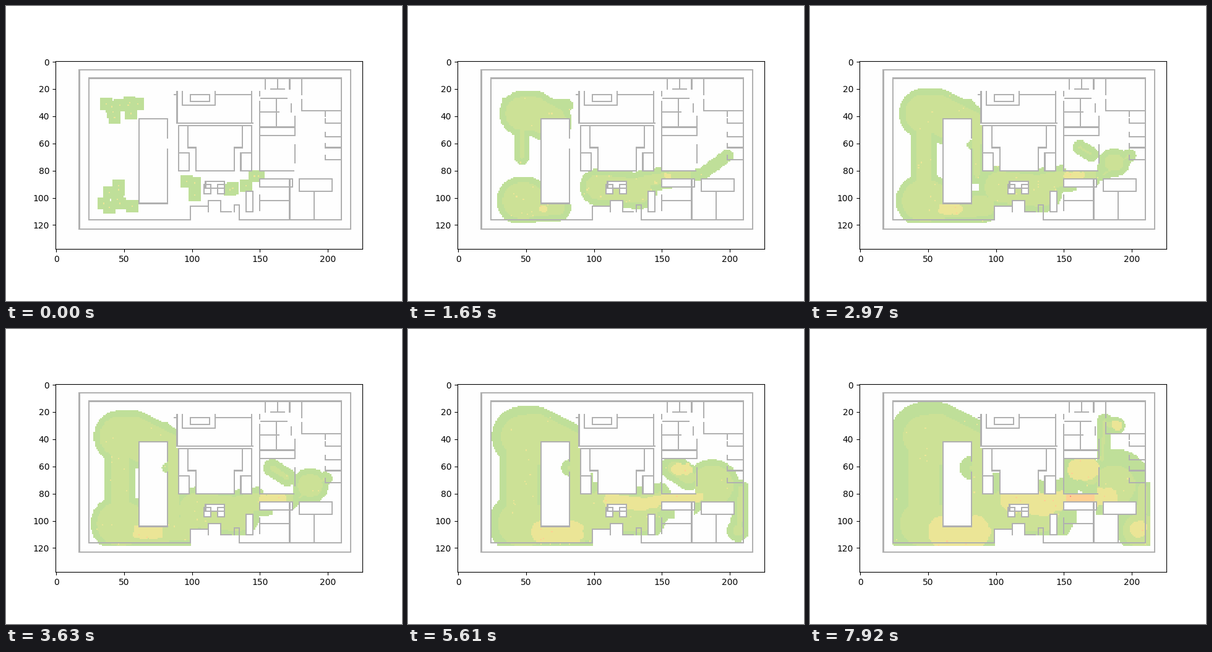
A matplotlib script for the animation above (8 s loop, 640 px wide and 476 px high).

```python
import numpy as np
import matplotlib.pyplot as plt
from matplotlib.animation import FuncAnimation
from matplotlib.colors import to_rgb

COLS, ROWS = 226, 138
LOOP, TICK, STEP = 8000, 40, 330
STEPS = LOOP // STEP + 1
RIM = 4.5          # half the width of one visitor's footprint
CORE_AGE = 12      # steps until the busy core of a group stops growing
X, Y = np.meshgrid(np.arange(COLS), np.arange(ROWS))

# empty, quiet, busy, warm, hot, peak, wall
PALETTE = np.array([to_rgb(c) for c in (
    "#fefefe", "#bfdf99", "#cce196", "#ebe596",
    "#fdd093", "#fb8d80", "#b0b0b0")])
WALL = 6

# where visitors stand at the start
SEEDS = [(37, 31), (41, 33), (43, 41), (42, 37), (47, 32), (54, 30), (53, 32),
         (60, 31), (55, 38), (46, 91), (46, 94), (39, 96), (45, 101),
         (35, 104), (39, 107), (47, 104), (56, 106), (96, 88), (102, 89),
         (102, 98), (128, 94), (130, 93), (140, 91), (146, 84), (149, 84)]

# groups: zone, from, to, departure, arrival, first radius, growth per step
CROWD = [
    ("open", (47, 38), (56, 38), 0, 1, 14.3, .465),
    ("open", (56, 38), (80, 50), 3, 7, 15.7, .465),
    ("open", (46, 102), (50, 102), 0, 1, 15.5, .465),
    ("open", (47, 38), (47, 102), 4, 6, 5.4, .86),
    ("open", (50, 108), (96, 106), 0, 10, 8, .45),
    ("open", (86, 50), (86, 100), 7, 10, 5, .9),
    ("open", (103, 92), (133, 95), 0, 1, 10.5, .6),
    ("open", (135, 88), (168, 83), 0, 2, 6, .46),
    ("open", (186, 74), (188, 74), 5, 6, 6, 1.1),
    ("open", (208, 76), (207, 107), 11, 15, 4.5, .3),
    ("open", (206, 107), (206, 107), 14, 15, 5, 1.2),
    ("open", (178, 55), (180, 27), 18, 21, 4.5, .2),
    ("open", (180, 29), (189, 30), 21, 24, 4.5, .6),
    ("open", (149, 84), (179, 83), 0, 3, RIM, 0),
    ("open", (179, 83), (198, 69), 3, 5, RIM, .1),
    ("open", (60, 31), (80, 32), 0, 3, RIM, 0),
    ("room", (170, 68), (159, 61), 6, 10, 4, .5),
    ("room", (148, 80), (148, 80), 3, 4, 0, .6),
    ("block", (82, 61), (82, 61), 5, 6, 2, .35),
]
WARM = [
    ("open", (62, 108), (84, 108), 4, 17, 2, .5),
    ("open", (153, 84), (172, 83), 4, 14, 2, .2),
    ("open", (136, 88), (112, 85), 12, 17, 2, .55),
    ("open", (136, 88), (153, 84), 12, 16, 2, .4),
    ("open", (172, 83), (183, 82), 14, 20, 2, .45),
    ("open", (205, 106), (205, 106), 18, 19, 1, .9),
    ("open", (189, 30), (189, 30), 22, 23, 1, 1.5),
    ("room", (161, 62), (168, 62), 13, 14, 2, .55),
]
HOT = [("open", (154, 83), (170, 83), 17, 24, 1.5, .2)]


def draw_walls():
    plan = np.zeros((ROWS, COLS), bool)

    def wall(c, r, *turns):
        """Follow turns that alternate between a column and a row."""
        for i, v in enumerate(turns):
            nc, nr = (c, v) if i % 2 else (v, r)
            plan[min(r, nr):max(r, nr) + 1, min(c, nc):max(c, nc) + 1] = True
            c, r = nc, nr

    def box(c0, r0, c1, r1):
        wall(c0, r0, c1, r1, c0, r0)

    box(17, 6, 217, 123)
    wall(131, 110, 131, 105, 135, 116, 210, 12, 24, 116, 99, 106, 112, 102,
         121, 110, 129)
    wall(112, 102, 112, 110)
    wall(82, 56, 82, 42, 61, 104, 82, 64)

    # north hall
    wall(87, 24, 89, 45, 145)
    wall(89, 22, 89, 24)
    wall(93, 22, 93, 32, 117, 22)
    wall(117, 24, 144)
    wall(144, 22, 144, 45)
    box(99, 24, 113, 29)

    # middle hall, the same on both sides of its axis
    for side in (-1, 1):
        def at(d):
            return 117 + side * d
        wall(117, 47, at(27), 80, at(19), 67, at(27))
        wall(117, 47, at(20), 63, at(14), 80, 117)

    # desks and low rooms
    wall(110, 93, 110, 88, 124, 93, 110)
    for c in (109, 119):
        box(c, 90, c + 5, 97)
    box(140, 95, 145, 110)
    box(150, 86, 174, 92)
    box(179, 86, 203, 95)
    wall(150, 98, 150, 109)
    wall(150, 102, 172)
    wall(172, 86, 172, 116)
    wall(190, 95, 190, 116)

    # east wing
    for c in (154, 163, 172):
        wall(c, 12, c, 20)
    wall(158, 20, 168)
    wall(150, 22, 150, 25)
    wall(150, 29, 150, 80, 175)
    wall(151, 27, 170)
    wall(150, 37, 164)
    for r in (48, 54):
        wall(150, r, 176)
    wall(162, 27, 162, 48)
    wall(173, 31, 173, 37)
    wall(176, 40, 176, 54)
    wall(176, 61, 176, 74)
    wall(181, 12, 181, 24)
    wall(181, 28, 181, 36, 210)
    wall(198, 36, 198, 40)
    for r in (45, 55, 63, 72):
        wall(198, r - 3, 198, r, 209)
    return plan


def area(c0, r0, c1, r1):
    return (X >= c0) & (X <= c1) & (Y >= r0) & (Y <= r1)


def make_zones():
    closed = [(89, 12, 174, 79), (61, 42, 82, 104), (110, 88, 124, 92),
              (109, 90, 114, 97), (119, 90, 124, 97), (140, 95, 145, 110),
              (150, 86, 173, 92), (180, 86, 203, 95), (100, 107, 112, 118),
              (112, 103, 121, 118), (121, 111, 189, 118), (160, 93, 173, 118),
              (174, 96, 189, 118), (211, 12, 213, 71)]
    space = area(24, 12, 213, 118)
    for rect in closed:
        space &= ~area(*rect)
    space |= area(89, 47, 90, 80)
    for c in (98, 131, 145):          # recesses north of the corridor
        space |= area(c, 65, c + 5, 80)
    return {"open": space, "room": area(150, 54, 176, 80),
            "block": area(61, 42, 82, 104)}


ZONES = make_zones()


def reach(group, s, inset=0, max_age=STEPS):
    """Cells covered by a group that walks a line and spreads out from it."""
    zone, (ax, ay), (bx, by), start, end, radius, growth = group
    age = s - start
    if age <= 0:
        return np.zeros(X.shape, bool)
    u = min(age / (end - start), 1)
    dx, dy = (bx - ax) * u, (by - ay) * u
    h = ((X - ax) * dx + (Y - ay) * dy) / max(dx * dx + dy * dy, 1e-9)
    h = np.clip(h, 0, 1)
    dist = np.hypot(X - ax - h * dx, Y - ay - h * dy)
    size = (radius + growth * min(age, max_age)) * (1 - .3 * np.exp(-age))
    return ZONES[zone] & (dist < size - inset)


def heat_level(s):
    level = np.zeros(X.shape, int)
    for c, r in SEEDS:
        level[area(c - 4, r - 4, c + 4, r + 4) & ZONES["open"]] = 1
    layers = [(1, CROWD, {}),
              (2, CROWD, {"inset": RIM, "max_age": CORE_AGE}),
              (3, WARM, {"inset": .6 * np.sin(X * .9) * np.cos(Y * .7)}),
              (4, HOT, {})]
    for value, groups, options in layers:
        for group in groups:
            mask = reach(group, s, **options)
            level[mask] = np.maximum(level[mask], value)
    return level


def add_people(level, s):
    """Light up single cells where people stand now and stood just before."""
    if s == 0:
        for c, r in SEEDS:
            level[r, c] = 3
        return
    base = level.copy()
    weight = base.ravel() ** 1.6
    for t in (s - 1, s):
        rng = np.random.default_rng(40 + t)
        spots = rng.choice(base.size, 16, p=weight / weight.sum())
        level.flat[spots] = np.maximum(base.flat[spots] + 1, 3)


def build_images():
    walls = draw_walls()
    images = []
    for s in range(STEPS):
        level = heat_level(s)
        add_people(level, s)
        images.append(PALETTE[np.where(walls, WALL, level)])
    return images


IMAGES = build_images()
fig, ax = plt.subplots(figsize=(6.4, 4.76), dpi=100)
picture = ax.imshow(IMAGES[0], interpolation="nearest")


def update(i):
    s = (i * TICK + TICK - 1) // STEP
    picture.set_data(IMAGES[min(s, STEPS - 1)])
    return [picture]


anim = FuncAnimation(fig, update, frames=LOOP // TICK, interval=TICK,
                     repeat=True, repeat_delay=0, blit=False)
plt.show()
```
